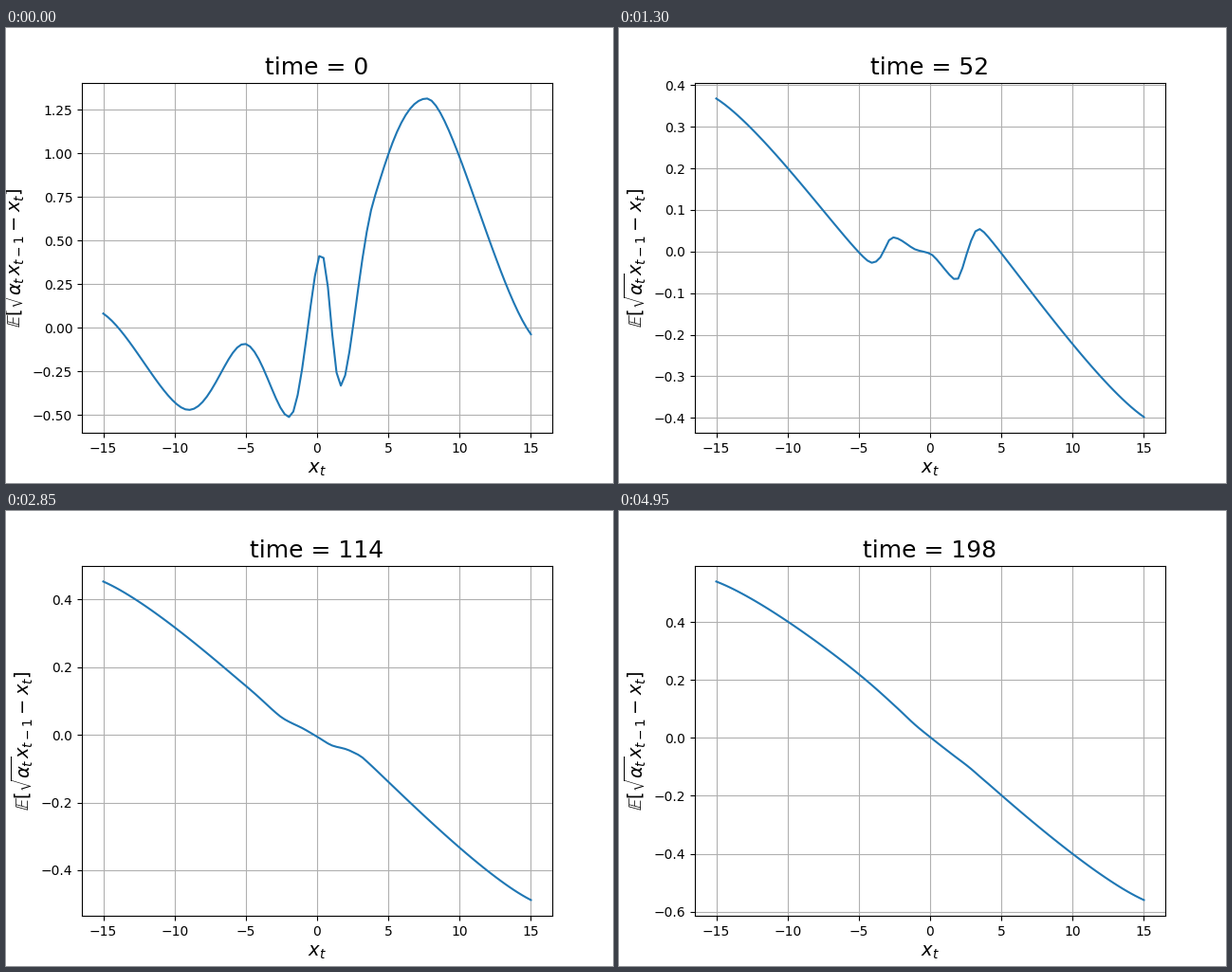
A matplotlib script for the animation above (5000 ms loop, 640x480 px).

```python
import numpy as np
import matplotlib.pyplot as plt
from matplotlib.animation import FuncAnimation

FRAMES, STEP = 100, 2
GRID = np.linspace(-15, 15, 100)

# Both ends, the six turning points and one flank (third from last) of the
# wave, at the times between which it drifts
TIMES = np.array([0, 20, 52, 88, 198])
KEYS = np.array([
    [[-15, -9, -5.1, -1.95, 0.28, 1.67, 4, 7.7, 15],
     [0.081, -0.472, -0.093, -0.513, 0.425, -0.333, 0.74, 1.315, -0.038]],
    [[-15, -7.75, -5, -2, -0.6, 3.3, 4.65, 6.15, 15],
     [0.315, -0.1, 0.118, -0.079, 0.076, -0.16, 0.02, 0.217, -0.331]],
    [[-15, -4.1, -2.6, -1, 0, 1.82, 2.6, 3.5, 15],
     [0.368, -0.027, 0.034, 0.0045, -0.005, -0.068, -0.003, 0.054, -0.398]],
    [[-15, -5, -2.2, -1, 0, 0.9, 1.7, 2.5, 15],
     [0.413, 0.109, 0.016, 0.008, -0.008, -0.0215, -0.0155, -0.017, -0.455]],
    [[-15, -5.5, -2.5, -1, 0.2, 1.5, 2.7, 4, 15],
     [0.54, 0.24, 0.112, 0.043, -0.005, -0.055, -0.1, -0.155, -0.56]],
])
END_PULL = np.array([[1], [0.6]])  # tangent strength of x and y at the ends


def points_at(t):
    """Key points at time t, moving evenly on a logarithmic clock."""
    clock = np.log(TIMES + 6)
    pos = np.interp(np.log(t + 6), clock, np.arange(len(TIMES)))
    i = min(int(pos), len(TIMES) - 2)
    return KEYS[i] + (pos - i) * (KEYS[i + 1] - KEYS[i])


def tangents(step):
    """Harmonic mean of neighbouring steps, flat at turning points."""
    a, b = step[:, :-1], step[:, 1:]
    inner = 2 * np.sign(a) * np.maximum(a * b, 0) / (abs(a) + abs(b))
    return np.hstack([END_PULL * step[:, :1], inner, END_PULL * step[:, -1:]])


def curve(t):
    """Ease x and y from key point to key point, then sample on the grid."""
    pts = points_at(t)
    step = np.diff(pts)
    k = tangents(step)
    s = np.linspace(0, step.shape[1], 1601)
    i = np.minimum(s.astype(int), step.shape[1] - 1)
    u = s - i
    x, y = (pts[:, i] + step[:, i] * u**2 * (3 - 2 * u)
            + k[:, i] * u * (1 - u)**2 - k[:, i + 1] * u**2 * (1 - u))
    return np.interp(GRID, x, y)


fig, ax = plt.subplots(figsize=(6.4, 4.8), dpi=100)


def draw(frame):
    t = frame * STEP
    ax.clear()
    ax.plot(GRID, curve(t))
    ax.set_title(f"time = {t}", fontsize=18)
    ax.set_xlabel("$x_t$", fontsize=14)
    ax.set_ylabel(r"$\mathbb{E}[\sqrt{\alpha_t}x_{t-1} - x_t]$", fontsize=14)
    ax.grid(True)


anim = FuncAnimation(fig, draw, frames=FRAMES, init_func=lambda: draw(0),
                     interval=50, repeat=True, repeat_delay=0)
plt.show()
```
